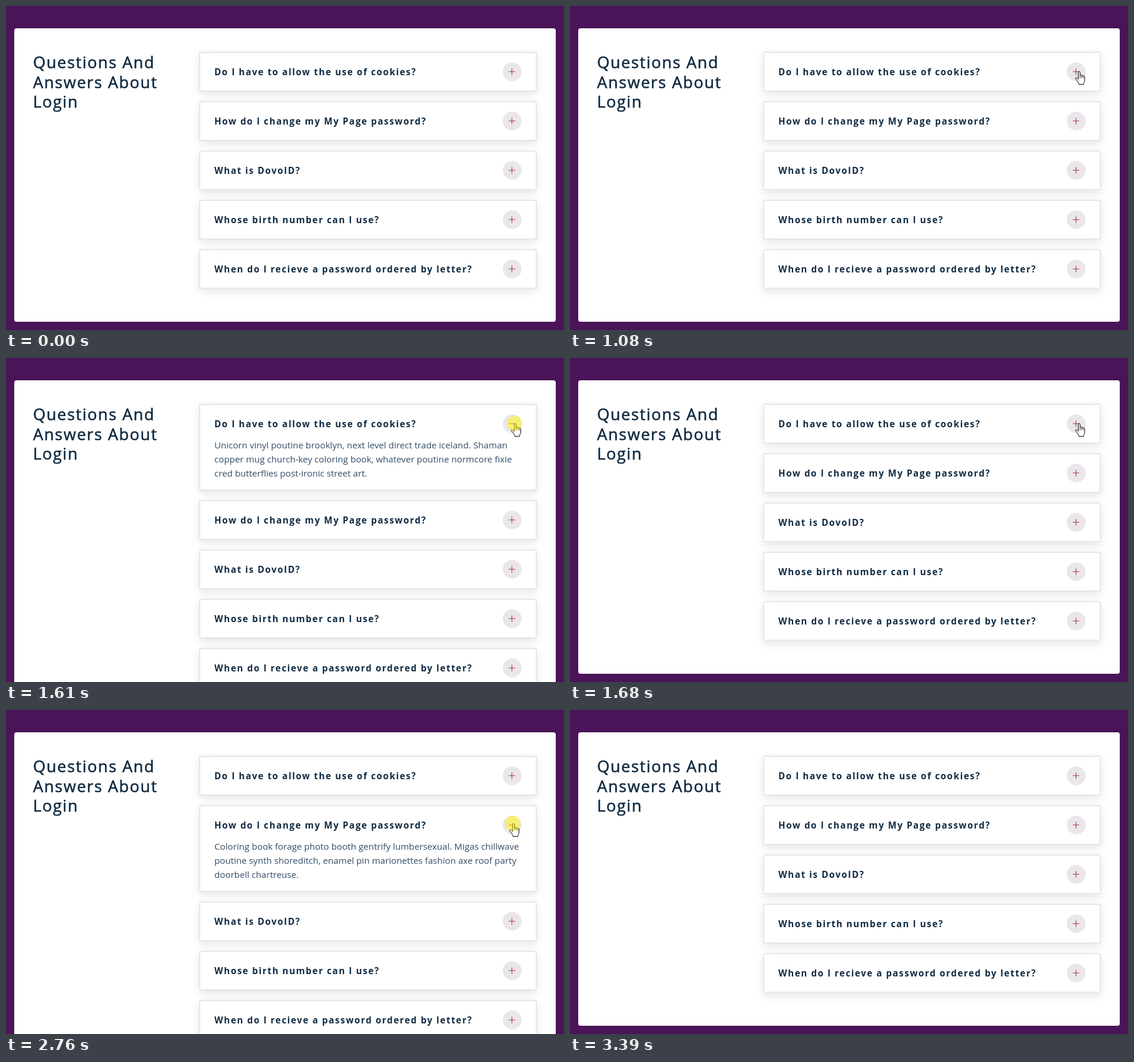
An HTML page that plays this animation: 948x552 px, repeating every 3.72 s.

```html
<!DOCTYPE html>
<html lang="en">
<head>
<meta charset="utf-8">
<title>Login questions</title>
<style>
  * { box-sizing: border-box; margin: 0; padding: 0; }
  html, body { width: 100%; height: 100%; overflow: hidden; background: #4b1358; }
  body { position: relative; font-family: "Open Sans", "Noto Sans", sans-serif; color: #102a42; }
  .panel {
    position: absolute; left: 14px; top: 38px; width: 920px;
    padding: 40px 32px; border-radius: 4px; background: #fff;
    display: grid; grid-template-columns: 250px 1fr; gap: 32px;
  }
  h3 {
    position: relative; top: 1px; -webkit-text-stroke: .55px;
    font-size: 27.2px; font-weight: 400; line-height: 33.6px; letter-spacing: 1.6px; white-space: nowrap;
  }
  .item {
    padding: 16px 24px; margin-bottom: 16px; border: 2px solid #e8e6e8; border-radius: 4px;
    background: #fff; box-shadow: 0 5px 15px rgba(0, 0, 0, .1); white-space: nowrap;
  }
  header { display: flex; justify-content: space-between; align-items: center; height: 32px; }
  h4 { font-size: 15.25px; font-weight: 700; line-height: 24px; letter-spacing: 1.58px; }
  p { display: none; margin-top: 8px; font-size: 15.2px; line-height: 24px; color: #324d67; }
  .open p { display: block; }
  .button { width: 32px; height: 32px; border-radius: 50%; background: #eae6eb; stroke: #a52f30; }
  .open .upright { display: none; }
  .pointer { position: absolute; left: 0; top: 0; width: 948px; height: 552px; }
  .pointer path { fill: #fff; stroke: #000; stroke-linejoin: round; }
  .pointer .lines { fill: none; }
  .pointer circle { fill: #fff500; fill-opacity: .5; }
</style>
</head>
<body>
<main class="panel">
  <h3>Questions And<br>Answers About<br>Login</h3>
  <section id="list"></section>
</main>
<svg class="pointer" viewBox="0 0 948 552">
  <g id="arrow"><path d="M.5 .5V16.6L4.2 13.1 6.6 18.7 9 17.7 6.7 12.2H11.8Z"/></g>
  <g id="hand">
    <g transform="translate(-6 -1)">
      <path d="M5.5 14V2a1.5 1.5 0 0 1 3 0V7.5a1.5 1.3 0 0 1 3 .3a1.5 1.3 0 0 1 2.7 .6a1.4 1.3 0 0 1 2.3 1.1V15C16.5 18 14.5 19 14.5 22.5H6.5C6.5 19.5 3.5 17 .8 12.7C0 11 2 10.3 3.2 11.5Z"/>
      <path class="lines" d="M8.5 7.5V11.5M11.4 8V11.5M14.2 9V12"/>
    </g>
  </g>
  <circle id="click" r="13"/>
</svg>
<script>
  const LOOP = 3720;
  const questions = [
    ["Do I have to allow the use of cookies?",
      "Unicorn vinyl poutine brooklyn, next level direct trade iceland. Shaman<br>copper mug church-key coloring book, whatever poutine normcore fixie<br>cred butterflies post-ironic street art."],
    ["How do I change my My Page password?",
      "Coloring book forage photo booth gentrify lumbersexual. Migas chillwave<br>poutine synth shoreditch, enamel pin marionettes fashion axe roof party<br>doorbell chartreuse."],
    ["What is DovoID?", ""],
    ["Whose birth number can I use?", ""],
    ["When do I recieve a password ordered by letter?", ""]
  ];

  // Pointer: start time, x, y, shape
  const moves = [
    [0, 0, 0, ""],
    [310, 903, 538, "arrow"], [380, 897, 470, "arrow"], [450, 883, 368, "arrow"],
    [520, 862, 260, "arrow"], [590, 840, 171, "arrow"], [660, 828, 129, "arrow"],
    [730, 835, 124, "arrow"], [800, 849, 122, "hand"], [870, 858, 116, "hand"],
    [940, 862, 113, "hand"], [1010, 864, 112, "hand"],
    [1750, 864, 115, "hand"], [1820, 865, 125, "hand"], [1890, 865, 144, "arrow"],
    [1960, 864, 166, "arrow"], [2030, 863, 183, "hand"], [2100, 862, 191, "hand"],
    [2180, 861, 194, "hand"],
    [2910, 868, 204, "hand"], [2980, 881, 246, "arrow"], [3050, 898, 324, "arrow"],
    [3120, 913, 412, "arrow"], [3180, 923, 480, "arrow"], [3250, 929, 522, "arrow"],
    [3320, 932, 540, "arrow"], [3390, 0, 0, ""]
  ];
  const clicks = [[1140, 1210], [1610, 1680], [2310, 2380], [2760, 2840]];
  const opened = [[1210, 1680], [2380, 2840]];

  const $ = id => document.getElementById(id);
  const within = (t, [from, to]) => t >= from && t < to;

  const button = `<svg class="button" viewBox="0 0 32 32">
    <path d="M10.2 15.9h10.8"/><path class="upright" d="M15.5 10.4v11.2"/></svg>`;
  $("list").innerHTML = questions.map(([title, text]) =>
    `<article class="item"><header><h4>${title}</h4>${button}</header><p>${text}</p></article>`
  ).join("");
  const items = [...document.querySelectorAll(".item")];

  function show(el, visible, x, y) {
    el.style.display = visible ? "" : "none";
    el.setAttribute("transform", `translate(${x} ${y})`);
  }

  function draw(t) {
    const [, x, y, shape] = moves.filter(m => m[0] <= t).pop();
    show($("arrow"), shape === "arrow", x, y);
    show($("hand"), shape === "hand", x, y);
    show($("click"), clicks.some(c => within(t, c)), x, y - 1);
    opened.forEach((span, i) => items[i].classList.toggle("open", within(t, span)));
  }

  const start = performance.now();
  function tick() {
    draw((performance.now() - start) % LOOP);
    requestAnimationFrame(tick);
  }
  tick();
</script>
</body>
</html>
```
